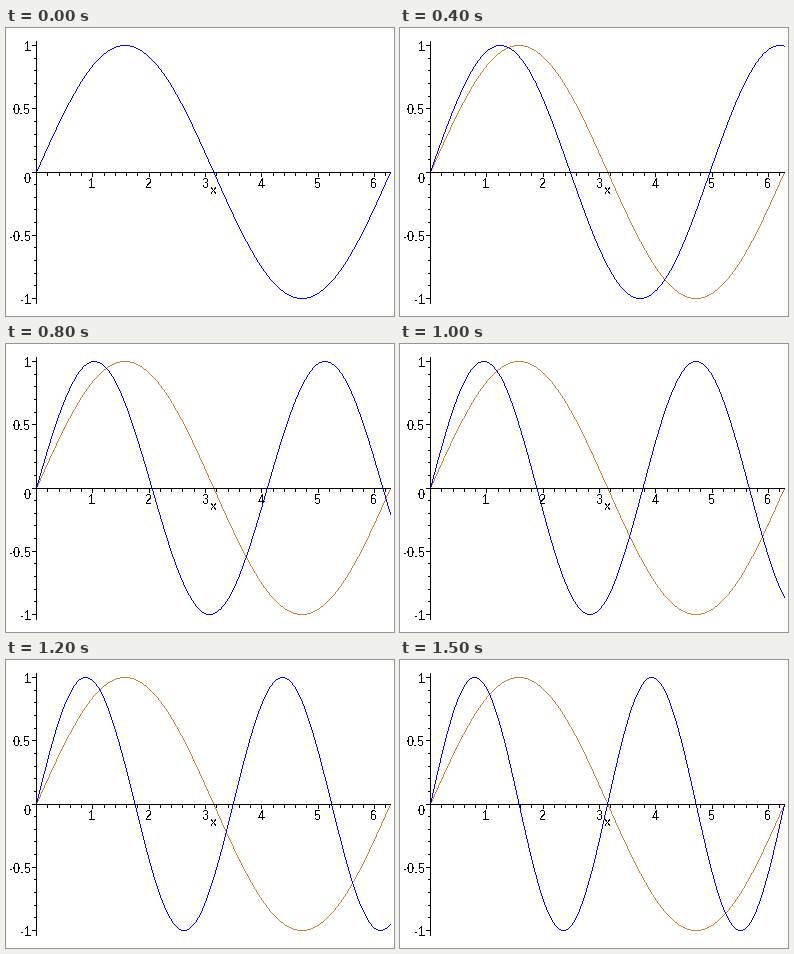
A matplotlib script for the animation above (1600 ms loop, 388 by 288 pixels).

```python
import matplotlib.pyplot as plt
import numpy as np
from matplotlib.animation import FuncAnimation
from matplotlib.patches import Rectangle

W, H, DPI = 388, 288, 64
FRAMES = 16
LEFT, SPAN = 30, 354          # pixel column of x = 0, width of one period
MID, AMP = 143.5, 126.5       # pixel row of y = 0, height of one unit
BLUE, ORANGE = (0, 0, 255), (204, 127, 50)

plt.rcParams.update({
    "font.family": "Liberation Sans",
    "text.hinting": "native",
    "text.hinting_factor": 1,
})


def nearest(v):
    return np.floor(np.asarray(v) + 0.5).astype(int)


def col(x):
    return nearest(LEFT + x * SPAN / (2 * np.pi))


def row(y):
    return nearest(MID - AMP * y)


def draw_sine(canvas, freq, color):
    """Plot sin(freq * x) one pixel wide, joining neighbouring columns."""
    x = np.linspace(0, 2 * np.pi, SPAN + 1)
    cols, rows = col(x), row(np.sin(freq * x))
    for c0, r0, c1, r1 in zip(cols, rows, cols[1:], rows[1:]):
        n = max(abs(c1 - c0), abs(r1 - r0)) + 1
        canvas[nearest(np.linspace(r0, r1, n)),
               nearest(np.linspace(c0, c1, n))] = color


fig = plt.figure(figsize=(W / DPI, H / DPI), dpi=DPI, facecolor="white")
ax = fig.add_axes([0, 0, 1, 1])
blank = np.full((H, W, 3), 255, np.uint8)
image = ax.imshow(blank, extent=(0, W, H, 0), interpolation="nearest",
                  aspect="auto")
ax.set_xlim(0, W)
ax.set_ylim(H, 0)
ax.axis("off")


def bar(x, y, w, h):
    ax.add_patch(Rectangle((x, y), w, h, fc="black", lw=0, antialiased=False))


def label(x, y, s, ha="center"):
    ax.text(x, y, s, ha=ha, va="baseline", fontsize=13 * 72 / DPI,
            color="black", antialiased=False)


# Axes with major and minor ticks
bar(LEFT, 13, 1, 263)
bar(LEFT, 144, SPAN + 1, 1)
for i in range(1, 32):
    bar(col(i / 5), 145, 1, 4 if i % 5 == 0 else 3)
for i in range(-10, 11):
    size = 4 if i % 5 == 0 else 2
    bar(LEFT - size, row(i / 10), size, 1)

for i in range(1, 7):
    label(col(i), 160, str(i))
for y in (1, 0.5, -0.5, -1):
    label(25, row(y) + 6, f"{y:g}", "right")
label(25, 155, "0", "right")
label(207, 166, "x")


def update(i):
    canvas = blank.copy()
    draw_sine(canvas, 1, ORANGE)
    draw_sine(canvas, 1 + i / (FRAMES - 1), BLUE)
    image.set_data(canvas)
    return [image]


anim = FuncAnimation(fig, update, frames=FRAMES, interval=100, repeat=True,
                     repeat_delay=0)
plt.show()
```
